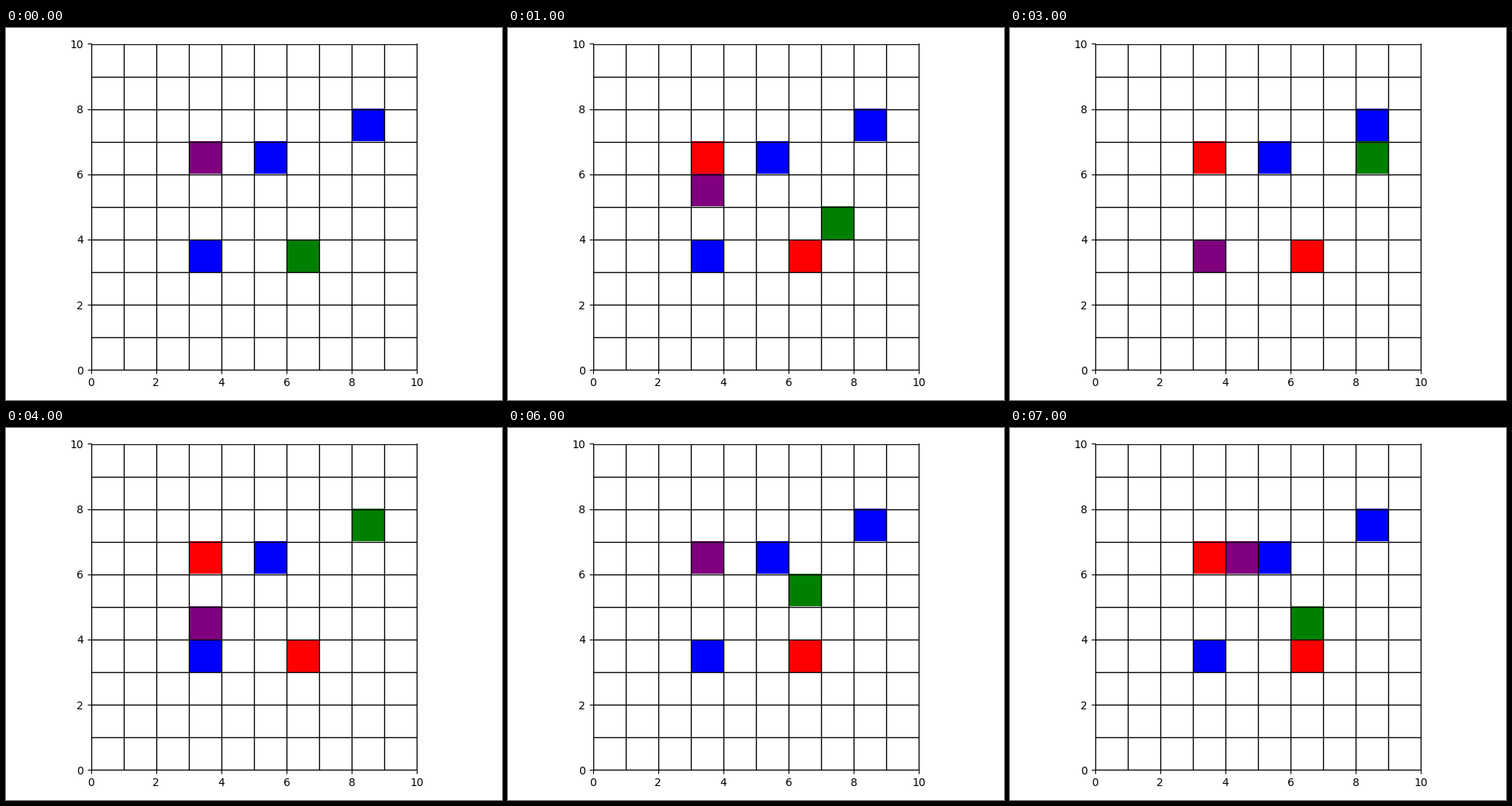
Recreate the animation shown at these times as a matplotlib script. Size 640 px wide and 480 px high, loop 8 s.

```python
import matplotlib.pyplot as plt
import numpy as np
from matplotlib.animation import FuncAnimation
from matplotlib.colors import to_rgb

N = 10
STEPS = 8

# Cells are (column, row), counted from the lower left corner.
# Each agent starts at home, visits its goals in turn and comes home between them.
GOALS = [(3, 3), (5, 6), (8, 7)]
AGENTS = {"purple": ((3, 6), GOALS[:2]), "green": ((6, 3), GOALS[2:])}


def walk(home, goals):
    """List one cell per step, moving like a chess king towards each stop."""
    path = [np.array(home)]
    for goal in goals:
        for stop in (goal, home):
            while (path[-1] != stop).any():
                path.append(path[-1] + np.sign(stop - path[-1]))
    return path[:STEPS]


PATHS = {color: walk(*plan) for color, plan in AGENTS.items()}


def board(step):
    grid = np.ones((N, N, 3))

    def paint(cell, color):
        col, row = cell
        grid[N - 1 - row, col] = to_rgb(color)

    for home, _ in AGENTS.values():
        paint(home, "red")
    for goal in GOALS:
        paint(goal, "blue")
    for color, path in PATHS.items():
        paint(path[step], color)
    return grid


fig, ax = plt.subplots(figsize=(6.4, 4.8), dpi=100)
image = ax.imshow(board(0), extent=(0, N, 0, N), interpolation="nearest")
for k in range(N + 1):
    ax.axhline(k, color="black", lw=1)
    ax.axvline(k, color="black", lw=1)
ticks = range(0, N + 1, 2)
ax.set(xlim=(0, N), ylim=(0, N), xticks=ticks, yticks=ticks)
fig.tight_layout()


def update(step):
    image.set_data(board(step))
    return [image]


anim = FuncAnimation(fig, update, frames=STEPS, interval=1000,
                     repeat=True, repeat_delay=0, blit=False)
plt.show()
```
